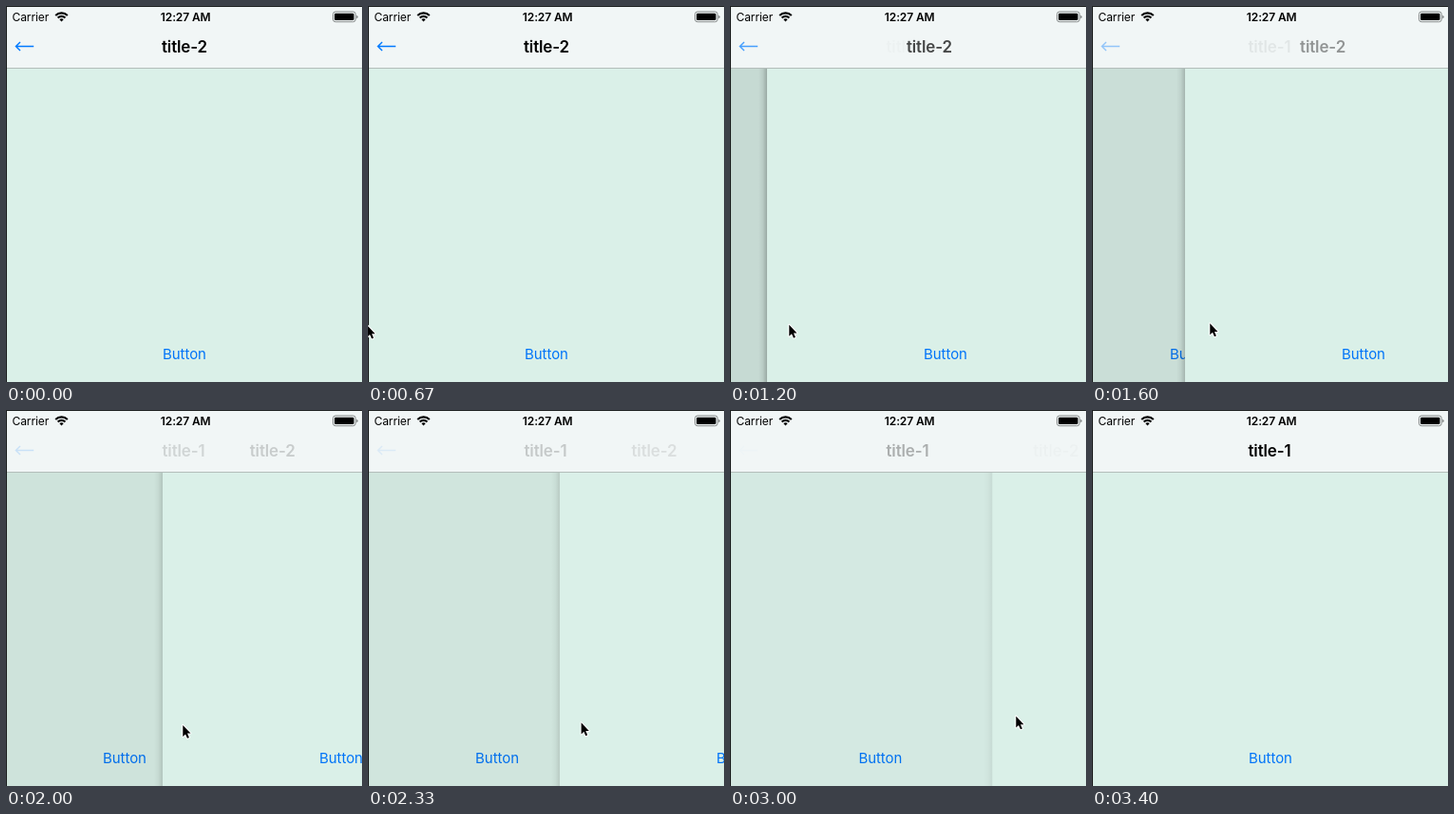
These frames come from a looping animation (375x396 px, 3790 ms). An HTML page:

```html
<!DOCTYPE html>
<html lang="en">
<head>
<meta charset="utf-8">
<title>Swipe back</title>
<style>
  html, body { margin: 0; width: 100%; height: 100%; overflow: hidden; background: #daf0e8; }
  svg { display: block; width: 375px; height: 396px; }
  text { font-family: Inter, "Liberation Sans", sans-serif; }
  .status { font-size: 12px; letter-spacing: -.1px; }
  .clock { font-weight: 600; }
  .title { font-size: 17px; font-weight: 600; letter-spacing: -.15px; }
  .button { font-size: 15px; letter-spacing: -.05px; fill: #0074f8; }
</style>
</head>
<body>
<svg viewBox="0 0 375 396">
  <defs>
    <linearGradient id="fade">
      <stop offset="0" stop-opacity="0"/>
      <stop offset=".5" stop-opacity=".3"/>
      <stop offset="1" stop-opacity="1"/>
    </linearGradient>
  </defs>

  <g id="back">
    <rect width="375" height="396" fill="#daf0e8"/>
    <text class="button" x="165" y="372">Button</text>
  </g>
  <rect id="dim" width="375" height="396"/>

  <g id="front">
    <rect id="shadow" x="-9" y="65" width="9" height="331" fill="url(#fade)"/>
    <rect width="375" height="396" fill="#daf0e8"/>
    <text class="button" x="165" y="372">Button</text>
  </g>

  <rect width="375" height="65" fill="#f1f6f6"/>
  <rect y="65" width="375" height="1" fill="#b3bdba"/>
  <path id="arrow" d="M29.2 42.5H10.7M15 37.9L10.4 42.5L15 47.1" fill="none" stroke="#007aff" stroke-width="1.4"/>
  <text id="title1" class="title" x="164.5" y="49">title-1</text>
  <text id="title2" class="title" x="164" y="49">title-2</text>

  <text class="status" x="6.5" y="16">Carrier</text>
  <g fill="none" stroke="#000" stroke-width="2.1">
    <path d="M52.2 9.9A9 9 0 0 1 64.8 9.9"/>
    <path d="M54.6 12.5A5.5 5.5 0 0 1 62.4 12.5"/>
    <path d="M58.5 16.4L56.4 14.3A3 3 0 0 1 60.6 14.3Z" fill="#000" stroke="none"/>
  </g>
  <text class="status clock" x="162.8" y="16">12:27 AM</text>
  <rect x="344.5" y="6" width="23.7" height="10.7" rx="2.6" fill="none" stroke="#858989"/>
  <rect x="346" y="7.7" width="20.5" height="7.3" rx="1.3"/>
  <path d="M369.2 9.8Q370.8 10.2 370.8 11.5T369.2 13.2Z" fill="#858989"/>

  <path d="M0 .5H375M.5 0V396" stroke="#1d2020"/>
  <path id="cursor" d="M.3 .5V12.6L3 10L5 14.4L6.9 13.5L5 9.2H8.5Z" stroke="#fff" stroke-width="2" paint-order="stroke" stroke-linejoin="round"/>
</svg>
<script>
const LOOP = 3790, STEP = 200 / 3, WIDTH = 375;
const RELEASE = 3067, SETTLE = 333, SLOW = 2000;
const [back, dim, front, shadow, arrow, title1, title2, cursor] =
  ['back', 'dim', 'front', 'shadow', 'arrow', 'title1', 'title2', 'cursor']
    .map(id => document.getElementById(id));

// Hand-dragged panel position: [ms, px]
const drag = [[870, 0], [1200, 39], [1600, 98], [SLOW, 165], [2730, 246], [RELEASE, 284]];

const clamp = v => Math.min(1, Math.max(0, v));
const ramp = (t, from, to) => clamp((t - from) / (to - from));
const smooth = u => u * u * (3 - 2 * u);
const move = (node, x, y = 0) => node.setAttribute('transform', `translate(${x} ${y})`);
const alpha = (node, value) => node.setAttribute('opacity', value);

function panelX(t) {
  let x = 0;
  for (let i = 1; i < drag.length; i++) {
    const [a, from] = drag[i - 1], [b, to] = drag[i];
    x += (to - from) * ramp(t, a, b);
  }
  return x + (WIDTH - x) * smooth(ramp(t, RELEASE, RELEASE + SETTLE));
}

// The pointer slips in at the edge, then pulls right and eases off.
function cursorX(t) {
  const enter = -10 + 9 * ramp(t, 0, 200);
  const pull = .155 * (Math.min(t, SLOW) - 800) + .115 * Math.max(0, t - SLOW);
  return Math.max(enter, pull);
}

const cursorY = t => 336 - 11 * (Math.max(0, t - 667) / 2063) ** 2;

function draw(time) {
  const t = Math.floor((time % LOOP + 4) / STEP) * STEP;
  const x = panelX(t), p = x / WIDTH, rest = 1 - p;
  const leaving = rest ** 3.1, hint = .45 * p ** 1.5;
  move(front, x);
  move(back, -.3 * WIDTH * rest);
  alpha(dim, .1 * rest);
  alpha(shadow, .25 * rest);
  move(title2, .562 * x);
  alpha(title2, leaving);
  alpha(arrow, leaving);
  alpha(title1, hint + (1 - hint) * ramp(t, 3270, RELEASE + SETTLE));
  move(cursor, cursorX(t), cursorY(t));
  alpha(cursor, t < 3250 ? 1 : 0);
}

let start;
function tick(now) {
  start ??= now;
  draw(now - start);
  requestAnimationFrame(tick);
}
draw(0);
requestAnimationFrame(tick);
</script>
</body>
</html>
```
